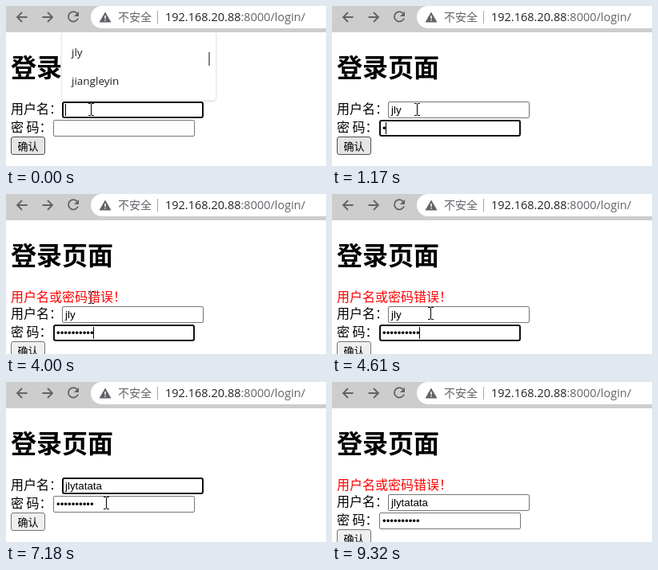
An HTML page for the animation above (9.42 s loop, 400 by 201 pixels).

```html
<!DOCTYPE html>
<html lang="zh-CN">
<head>
<meta charset="utf-8">
<style>
  html, body { margin: 0; width: 100%; height: 100%; overflow: hidden; background: #fff; }
  svg { display: block; }
  text { font: 350 16px "Noto Sans CJK SC", "Noto Sans CJK", sans-serif; }
  .title { font-size: 32px; font-weight: bold; }
  .secure { font-size: 14px; fill: #5f6368; }
  .url { font: 14.5px "Open Sans", "Noto Sans", sans-serif; fill: #5f6368; }
  .host { fill: #202124; }
  .value { font: 13.333px "Liberation Sans", Arial, sans-serif; }
  .label { font-size: 13px; text-anchor: middle; }
  .item { font: 13.5px "Open Sans", "Noto Sans", sans-serif; fill: #202124; }
  .icon { fill: none; stroke: #5f6368; stroke-width: 1.8; }
  .field { fill: #fff; stroke: #767676; }
  #button { fill: #efefef; stroke: #767676; }
  #button.hover { fill: #e5e5e5; stroke: #4f4f4f; }
  #popupBox { fill: #fff; stroke: #e8eaed; filter: drop-shadow(0 1px 1px #0002); }
  #beam { fill: none; stroke: #fff; mix-blend-mode: difference; }
</style>
</head>
<body>
<svg width="400" height="201" viewBox="0 0 400 201">
  <rect width="400" height="201" fill="#fff"/>

  <text class="title" x="6" y="89">登录页面</text>
  <text id="error" x="6" y="135" fill="#f00">用户名或密码错误！</text>

  <g id="form">
    <text x="6" y="135">用户名：</text>
    <rect class="field" id="userBox"/>
    <text class="value" id="userText" x="74" y="135"></text>
    <text x="6" y="158">密 码：</text>
    <rect class="field" id="passBox"/>
    <text class="value" id="passText" x="63" y="158"></text>
    <rect id="caret" width="1" height="15"/>
    <rect id="button" x="6.5" y="164.5" width="42" height="22" rx="2.5"/>
    <text class="label" x="27.5" y="181">确认</text>
  </g>

  <g id="popup">
    <rect id="popupBox" x="69.5" y="-2.5" width="193" rx="4"/>
    <text class="item" x="82" y="29">jly</text>
    <text class="item" id="secondItem" x="82" y="65">jiangleyin</text>
    <rect id="thumb" x="253" y="24" width="2" height="17" fill="#858585"/>
  </g>

  <rect width="400" height="33" fill="#cdcdcd"/>
  <rect x="106" y="0" width="320" height="28" rx="14" fill="#fff"/>
  <path class="icon" d="M26.5 14H14M20 8L14 14L20 20"/>
  <path class="icon" d="M45.5 14H58M52 8L58 14L52 20"/>
  <path class="icon" d="M89 9.5A6.2 6.2 0 1 0 90 15.5"/>
  <path d="M91 7V13H85Z" fill="#5f6368"/>
  <path d="M124 7.5L131.5 20.5H116.5Z" fill="#5f6368"/>
  <path d="M124 12V16M124 17V18.6" stroke="#fff" stroke-width="1.5"/>
  <text class="secure" x="140" y="19">不安全</text>
  <path d="M189.5 6V22" stroke="#a5a8ac"/>
  <text class="url" x="199" y="19"><tspan class="host">192.168.20.88</tspan>:8000/login/</text>

  <path id="beam" d="M-3 -7.5H0M1 -7.5H4M.5 -7V7M-3 7.5H0M1 7.5H4"/>
  <path id="arrow" d="M.5 .5V15.5L4 12L6.5 17.5L9 16.5L6.5 11H11.5Z" fill="#fff" stroke="#000"/>
</svg>
<script>
const LOOP = 9420;
const $ = id => document.getElementById(id);
const show = (id, visible) => $(id).setAttribute('visibility', visible ? 'visible' : 'hidden');
const set = (id, attrs) => {
  for (const name in attrs) $(id).setAttribute(name, attrs[name]);
};

const fields = {
  user: { x: 70, y: 120, textX: 74 },
  pass: { x: 59, y: 143, textX: 63 },
};

// Each entry changes only the listed parts of the state.
const events = [
  [0, { user: '', pass: 0, focus: 'user', caret: true, popup: 'list', error: false,
        hover: true, pointer: 'beam', at: [106, 130] }],
  [120, { user: 'j', popup: 'matches' }],
  [255, { user: 'jl', popup: 'single' }],
  [390, { user: 'jly', popup: '' }],
  [670, { focus: 'pass' }],
  ...[1, 3, 4, 6, 8, 10].map((pass, i) => [1170 + i * 144, { pass }]),
  [2170, { error: true, hover: false }],
  [2420, { caret: false }],
  [2950, { caret: true }],
  [3480, { caret: false }],
  [4000, { caret: true }],
  [4625, { focus: 'user' }],
  [5120, { focus: '' }],
  [5270, { focus: 'user' }],
  [5710, { user: 'jlyta', error: false }],
  [6240, { caret: false }],
  [6370, { user: 'jlytat', caret: true }],
  [6500, { user: 'jlytata' }],
  [6625, { user: 'jlytatat' }],
  [6750, { user: 'jlytatata' }],
  [7180, { caret: false }],
  [7330, { error: true, caret: true }],
  [7760, { caret: false }],
  [8260, { caret: true }],
  [8550, { at: [190, 172] }],
  [8680, { pointer: 'arrow', at: [284, 184] }],
  [8810, { pointer: '', caret: false }],
  [9320, { focus: '' }],
];

function pointerPosition(t, at) {
  if (t < 4000 || t >= 8550) return at;
  const p = Math.min(1, Math.floor((t - 4000) / 125) / 5);
  const ease = p * p * (3 - 2 * p);
  return [106 + Math.round(19 * ease), 130 + Math.round(22 * ease)];
}

function drawField(name, focused) {
  const { x, y } = fields[name];
  const inset = focused ? 1 : 0.5;
  set(name + 'Box', {
    x: x + inset, y: y + inset, width: 177 - 2 * inset, height: 21 - 2 * inset,
    rx: focused ? 2 : 1.5,
    style: focused ? 'stroke:#101010;stroke-width:2' : '',
  });
}

function draw(t) {
  const state = {};
  for (const [time, change] of events) if (time <= t) Object.assign(state, change);

  show('error', state.error);
  set('form', { transform: `translate(0 ${state.error ? 21 : 0})` });
  set('button', { class: state.hover ? 'hover' : '' });
  $('userText').textContent = state.user;
  $('passText').textContent = '•'.repeat(state.pass);
  for (const name in fields) drawField(name, state.focus === name);

  const field = fields[state.focus];
  show('caret', field && state.caret);
  if (field) {
    const text = $(state.focus + 'Text');
    const width = text.textContent ? text.getComputedTextLength() : 0;
    set('caret', { x: Math.floor(field.textX + width), y: field.y + 3 });
  }

  const single = state.popup === 'single';
  $('popup').style.display = state.popup ? '' : 'none';
  set('popup', { transform: `translate(0 ${single ? 144 : 34})` });
  set('popupBox', { height: single ? 51 : 87 });
  show('secondItem', !single);
  show('thumb', state.popup === 'list');

  const [x, y] = pointerPosition(t, state.at);
  for (const shape of ['beam', 'arrow']) {
    show(shape, state.pointer === shape);
    set(shape, { transform: `translate(${x} ${y})` });
  }
}

function tick() {
  draw(performance.now() % LOOP);
  requestAnimationFrame(tick);
}
tick();
</script>
</body>
</html>
```
